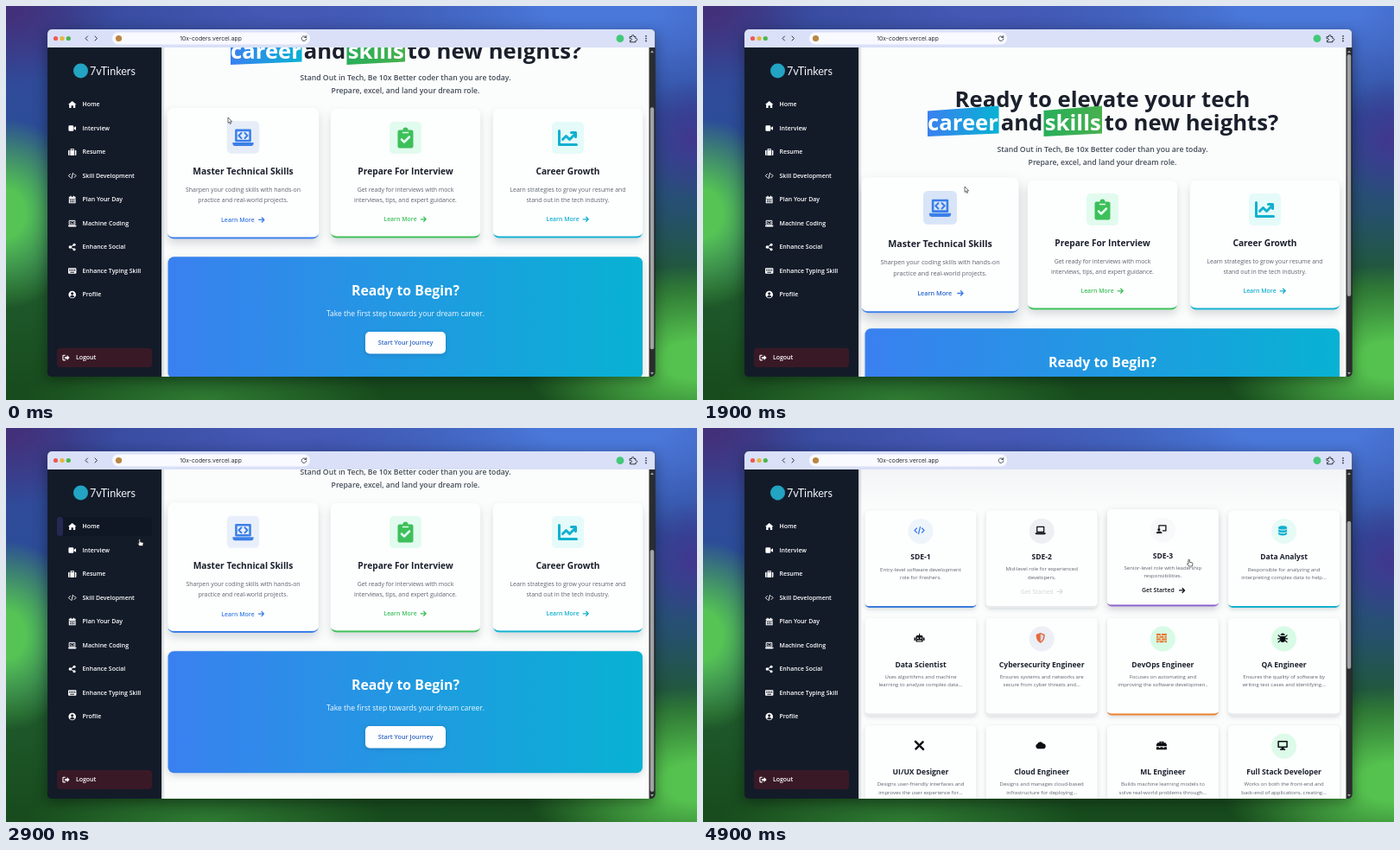
These frames come from a looping animation (800 px wide and 456 px high, 5000 ms). An HTML page:

```html
<!DOCTYPE html>
<html lang="en">
<head>
<meta charset="utf-8">
<title>Career site tour</title>
<style>
html, body { margin: 0; width: 100%; height: 100%; overflow: hidden; }
body {
  background:
    radial-gradient(ellipse 90px 110px at 0 240px, #55c455 25%, transparent),
    radial-gradient(ellipse 200px 110px at 800px 410px, #55c24f 20%, transparent),
    radial-gradient(ellipse 210px 60px at 230px 456px, #2f7a33, transparent),
    radial-gradient(ellipse 70px 70px at 795px 155px, #40378f, transparent),
    radial-gradient(ellipse 330px 130px at 690px 0, #4a78da 20%, transparent),
    radial-gradient(ellipse 260px 90px at 330px 0, #4458b4 15%, transparent),
    radial-gradient(ellipse 130px 90px at 0 0, #43307a 15%, transparent),
    linear-gradient(#35489a, #2c4c98 30%, #26506e 52%, #1f5a2c 72%, #174a1c);
}
svg { display: block; }
text { font-family: "Open Sans", "Noto Sans", sans-serif; }
</style>
</head>
<body>
<svg id="stage" width="800" height="456" viewBox="0 0 800 456"></svg>
<script>
const LOOP = 5000, STEP = 100;
const BLUE = '#3b7fe8', GREEN = '#3dc05a', CYAN = '#12b0d0', INK = '#1a202c', GRAY = '#5c636e';

// Markup helpers
const text = (x, y, size, str, fill = INK, weight = 400, anchor = 'middle', more = '') =>
  `<text x="${x}" y="${y + size * 0.357}" font-size="${size}" fill="${fill}" font-weight="${weight}" text-anchor="${anchor}" ${more}>${str}</text>`;
const rect = (x, y, w, h, r, fill, more = '') =>
  `<rect x="${x}" y="${y}" width="${w}" height="${h}" rx="${r}" fill="${fill}" ${more}/>`;
const line = (d, w = 2.5, color = 'currentColor') =>
  `<path d="${d}" fill="none" stroke="${color}" stroke-width="${w}" stroke-linecap="round" stroke-linejoin="round"/>`;
const fill = d => `<path d="${d}" fill="currentColor" fill-rule="evenodd"/>`;
const dot = (x, y, r, color = 'currentColor', more = '') => `<circle cx="${x}" cy="${y}" r="${r}" fill="${color}" ${more}/>`;
const grad = (id, a, b) =>
  `<linearGradient id="${id}"><stop stop-color="${a}"/><stop offset="1" stop-color="${b}"/></linearGradient>`;

// Icons on a 24 by 24 grid
const laptop = line('M4 4h16v12H4z') + fill('M0 18h24v1a3 3 0 0 1-3 3H3a3 3 0 0 1-3-3z');
const ICONS = {
  home: fill('M12 2 0 12h3v10h6v-7h6v7h6V12h3z'),
  video: fill('M4 4h9a3 3 0 0 1 3 3v10a3 3 0 0 1-3 3H4a3 3 0 0 1-3-3V7a3 3 0 0 1 3-3zM17 10l6-4v12l-6-4z'),
  bag: fill('M7 6V2h10v4h1v16H6V6zM9 6h6V4H9zM4 6v16H3a3 3 0 0 1-3-3V9a3 3 0 0 1 3-3zM20 6h1a3 3 0 0 1 3 3v10a3 3 0 0 1-3 3h-1z'),
  code: line('M6 7 1 12l5 5M18 7l5 5-5 5M14 4l-4 16'),
  date: fill('M6 1h3v3h6V1h3v3h4v5H2V4h4zM2 10h20v13H2zM5 12v3h4v-3zM10.500 12v3h4v-3zM16 12v3h3v-3zM5 17v3h4v-3zM10.500 17v3h4v-3zM16 17v3h3v-3z'),
  laptop,
  laptopCode: laptop + line('M10 7l-3 3 3 3M14 7l3 3-3 3', 2),
  share: line('M18 5 6 12l12 7') + dot(18, 5, 4) + dot(6, 12, 4.5) + dot(18, 19, 4),
  keys: fill('M2 4h20a2 2 0 0 1 2 2v12a2 2 0 0 1-2 2H2a2 2 0 0 1-2-2V6a2 2 0 0 1 2-2zM3 7v3h3V7zM8 7v3h3V7zM13 7v3h3V7zM18 7v3h3V7zM3 11.500v2h3v-2zM8 11.500v2h3v-2zM13 11.500v2h3v-2zM18 11.500v2h3v-2zM6 15.500v2h12v-2z'),
  user: fill('M12 1a11 11 0 1 0 0 22 11 11 0 0 0 0-22zM12 5a4 4 0 1 1 0 8 4 4 0 0 1 0-8zM5 18q3-4 7-4t7 4q-3 3-7 3t-7-3z'),
  exit: fill('M10 3v3H4v12h6v3H4a3 3 0 0 1-3-3V6a3 3 0 0 1 3-3zM15 4l8 8-8 8v-5H8V9h7z'),
  clip: fill('M5 3h4a3 3 0 0 1 6 0h4a2 2 0 0 1 2 2v17a2 2 0 0 1-2 2H5a2 2 0 0 1-2-2V5a2 2 0 0 1 2-2z') +
    line('M7.500 14l3 3 6-6', 2.5, '#e2fbef') + line('M9 6h6', 1.5, '#e2fbef'),
  chart: line('M2 4v16h20', 3) + line('M6 14l4-4 4 4 7-7M16 6h5v5', 3),
  teach: line('M6 9V4h16v12h-7') + dot(6, 13, 3) + fill('M0 22q0-5 5-5h3q5 0 5 5z'),
  data: fill('M2 5c0-5 20-5 20 0v2c0 4-20 4-20 0zM2 9c3 4 17 4 20 0v5c0 4-20 4-20 0zM2 16c3 4 17 4 20 0v4c0 5-20 5-20 0z'),
  robot: fill('M11 2h2v4h4a3 3 0 0 1 3 3v12H4V9a3 3 0 0 1 3-3h4zM7 11v3h3v-3zM14 11v3h3v-3zM7 17v2h10v-2zM0 11h3v7H0zM21 11h3v7h-3z'),
  shield: fill('M12 0 22 4q1 14-10 20Q1 18 2 4z') + '<path d="M12 3v17.500Q19.500 16 19 6z" fill="#d5dbe6"/>',
  brick: fill('M0 2h10v4H0zM12 2h12v4H12zM0 7.500h5v4H0zM7 7.500h10v4H7zM19 7.500h5v4h-5zM0 13h10v4H0zM12 13h12v4H12zM0 18.500h5v4H0zM7 18.500h10v4H7zM19 18.500h5v4h-5z'),
  bug: fill('M7 6a5 5 0 0 1 10 0zM6 8h12v8a6 6 0 0 1-12 0z') + line('M6 10 2 6M18 10l4-4M6 14H1M18 14h5M6 18l-4 4M18 18l4 4'),
  tools: line('M4 20 20 4', 5) + line('M3 3l6 6M15 15l6 6', 5),
  cloud: fill('M6 20a6 6 0 0 1-1-11.500A7 7 0 0 1 18 8a6 6 0 0 1 0 12z'),
  box: fill('M7 6V3h10v3h4l3 4v4H0v-4l3-4zM9.500 6h5V5h-5zM0 16h6v2h3v-2h6v2h3v-2h6v6H0z'),
  screen: line('M2 3h20v13H2z', 3) + fill('M9 17h6v3h3v3H6v-3h3z')
};
const icon = (name, x, y, size, color) =>
  `<g color="${color}" transform="translate(${x - size / 2} ${y - size / 2}) scale(${size / 24})">${ICONS[name]}</g>`;
const arrow = (id, x, y, color) =>
  `<g id="${id}" transform="translate(${x} ${y})">${line('M-3 0H3M.5-2.500 3 0 .5 2.500', 1.3, color)}</g>`;
// White card with a coloured bottom border that tapers into the corners
const panel = (id, x, y, w, h, r, edge) => {
  const q = r - 1.9, flat = w - 2 * r;
  return rect(x, y, w, h, r, '#fdfefe', `id="${id}"`) +
    `<path fill="${edge}" d="M${x} ${y + h - r}a${r} ${r} 0 0 0 ${r} ${r}h${flat}a${r} ${r} 0 0 0 ${r} ${-r}a${r} ${q} 0 0 1 ${-r} ${q}h${-flat}a${r} ${q} 0 0 1 ${-r} ${-q}z"/>`;
};

const FEATURES = [
  [274.5, 'Master Technical Skills', 'Sharpen your coding skills with hands-on', 'practice and real-world projects.', 'laptopCode', BLUE, '#eaf0fa'],
  [462.5, 'Prepare For Interview', 'Get ready for interviews with mock', 'interviews, tips, and expert guidance.', 'clip', GREEN, '#e2fbef'],
  [650.5, 'Career Growth', 'Learn strategies to grow your resume and', 'stand out in the tech industry.', 'chart', CYAN, '#e4fbf9']
];
const feature = ([x, title, a, b, name, color, tint], i) => `<g id="feat${i}">
  ${panel('fbase' + i, x - 86.7, 202, 173.4, 149.5, 7, color)}
  ${rect(x - 18.5, 217, 37, 37, 5, tint, `id="ftint${i}"`)}${icon(name, x, 235.5, 24, color)}
  ${text(x, 274.8, 10.2, title, INK, 700)}
  ${text(x, 295.5, 6.9, a, GRAY)}${text(x, 307.5, 6.9, b, GRAY)}
  ${text(x - 6, 329.8, 6.9, 'Learn More', color, 600, 'middle', `id="flink${i}"`)}${arrow('farrow' + i, x + 20.7, 329.8, color)}</g>`;

const ROLES = [
  ['SDE-1', 'Entry-level software development', 'role for Freshers.', 'code', BLUE, '#edf4fa', '#3b7bdc'],
  ['SDE-2', 'Mid-level role for experienced', 'developers.', 'laptop', '#0b0d12', '#edeff3', '#e6e8ea'],
  ['SDE-3', 'Senior-level role with leadership', 'responsibilities.', 'teach', '#0b0d12', '#f8f9fa', '#8a5fcb'],
  ['Data Analyst', 'Responsible for analyzing and', 'interpreting complex data to help...', 'data', CYAN, '#e6faf6', '#14b0cb'],
  ['Data Scientist', 'Uses algorithms and machine', 'learning to analyze complex data...', 'robot'],
  ['Cybersecurity Engineer', 'Ensures systems and networks are', 'secure from cyber threats and...', 'shield', '#e8683a', '#eceff5'],
  ['DevOps Engineer', 'Focuses on automating and', 'improving the software developmen..', 'brick', '#e8782e', '#d8fbe6', '#e8802e'],
  ['QA Engineer', 'Ensures the quality of software by', 'writing test cases and identifying...', 'bug', '#0b0d12', '#d8fbe6'],
  ['UI/UX Designer', 'Designs user-friendly interfaces and', 'improves the user experience for...', 'tools'],
  ['Cloud Engineer', 'Designs and manages cloud-based', 'infrastructure for deploying...', 'cloud'],
  ['ML Engineer', 'Builds machine learning models to', 'solve real-world problems through...', 'box'],
  ['Full Stack Developer', 'Works on both the front-end and', 'back-end of applications, creating...', 'screen', '#0b0d12', '#dcfbe8']
];
const role = ([title, a, b, name, color = '#0b0d12', tint = '#fdfefe', edge = '#e6e8ea'], i) => {
  const x = 252 + i % 4 * 140.2, y = 95.5 + Math.floor(i / 4) * 124.4;
  const link = i < 3 ? `<g id="rlink${i}">${text(x - 5.5, y + 94, 6.9, 'Get Started', color, 600)}${arrow('rarrow' + i, x + 20.7, y + 94, color)}</g>` : '';
  return `<g id="role${i}">${panel('rbase' + i, x - 64.5, y, 129, 112.5, 5, edge)}
    ${dot(x, y + 24, 14.5, tint, `id="rtint${i}"`)}${icon(name, x - 1.5, y + 23, 12, color)}
    ${text(x, y + 53.7, 8.55, title, INK, 700)}
    ${text(x, y + 68, 6.03, a, GRAY)}${text(x, y + 77.2, 6.03, b, GRAY)}${link}</g>`;
};

const MENU = [['Home', 'home'], ['Interview', 'video'], ['Resume', 'bag'], ['Skill Development', 'code'],
  ['Plan Your Day', 'date'], ['Machine Coding', 'laptopCode'], ['Enhance Social', 'share'],
  ['Enhance Typing Skill', 'keys'], ['Profile', 'user']];
const menuRow = ([label, name], i) => {
  const y = 114 + i * 27.5;
  return `<g id="row${i}" opacity="0">${rect(59, y - 11, 110, 22, 4, '#0e1624')}${rect(59, y - 11, 7, 22, 3, '#2c2d5e')}</g>` +
    icon(name, 76.7, y, 9.4, '#fff') + text(88.5, y, 6.95, label, '#fff', 600, 'start');
};

const homePage = `<g id="home"><g id="scroller">
  ${text(462.5, 107.4, 25.7, 'Ready to elevate your tech', INK, 700)}
  <path d="M260 121.500 342.500 115.500v32L260 151z" fill="url(#gBlue)"/>
  <path d="M394.500 121 462 115.500v32L394.500 151z" fill="url(#gGreen)"/>
  ${text(301, 135, 25.7, 'career', '#fff', 700)}${text(369, 135, 25.7, 'and', INK, 700)}
  ${text(428.3, 135, 25.7, 'skills', '#fff', 700)}${text(565.5, 135, 25.7, 'to new heights?', INK, 700)}
  ${text(462.5, 165.7, 8.7, 'Stand Out in Tech, Be 10x Better coder than you are today.', '#454d5a', 600)}
  ${text(462.5, 180.7, 8.7, 'Prepare, excel, and land your dream role.', '#454d5a', 600)}
  ${FEATURES.map(feature).join('')}
  ${rect(187.5, 373.3, 549.5, 141, 7, 'url(#gBlue)', 'style="filter:drop-shadow(0 3px 4px rgba(30,40,60,.18))"')}
  ${text(462.5, 412.7, 15.85, 'Ready to Begin?', '#fff', 700)}
  ${text(462.5, 439, 8.55, 'Take the first step towards your dream career.', '#f3f9ff')}
  ${rect(416, 460, 93, 25.5, 5, '#fdfeff', 'style="filter:drop-shadow(0 1px 2px rgba(20,40,80,.25))"')}
  ${text(462.5, 472.8, 7.25, 'Start Your Journey', '#2f66c6', 600)}
</g></g>`;

const rolesPage = `<g id="roles">${rect(180, 48, 564, 47, 0, 'url(#gTop)')}${ROLES.map(role).join('')}</g>`;

const sidebar = rect(180, 48, 4, 381, 0, 'url(#gSide)') + rect(48, 48, 132, 381, 0, '#131b29') +
  dot(86.5, 75, 8.5, '#22a4c2') +
  text(97, 75.5, 12.6, '7vTinkers', '#f4f7fa', 400, 'start', 'style="font-family:Lato,sans-serif"') +
  MENU.map(menuRow).join('') + rect(59, 396, 110, 22, 4, '#3a1926') +
  icon('exit', 69.5, 407, 9, '#fff') + text(81, 407, 6.95, 'Logout', '#fff', 600, 'start');

const status = `<g id="status">${rect(48, 419, 115, 10, 2, '#26292f')}
  ${text(50.5, 423.8, 5.2, 'https://10x-coders.vercel.app/interview/SDE-1', '#e2e5ea', 400, 'start')}</g>`;

const toolbar = rect(48, 27, 703.5, 21, 0, '#d9e0f7') +
  dot(57.5, 37.5, 2.6, '#ee5a50') + dot(65, 37.5, 2.6, '#e6b53c') + dot(72.3, 37.5, 2.6, '#4db64c') +
  line('M94.500 35 92 37.500l2.500 2.500M103 35l2.500 2.500-2.500 2.500', 1, '#30343c') +
  rect(123, 30.5, 229, 14, 7, '#f9faff') + dot(130.5, 37.5, 3.6, '#b98642') +
  text(237, 37.7, 6.8, '10x-coders.vercel.app', '#2a2d34', 400, 'middle', 'style="font-family:Inter,sans-serif"') +
  line('M347 35.700A2.800 2.800 0 1 0 347.800 38M347.800 34.500v2h-2', 0.9, '#3c4048') +
  dot(711, 37.7, 4.4, '#43c878') +
  line('M722.500 35.500h2a1.300 1.300 0 1 1 2.400 0h2v2.200a1.300 1.300 0 1 1 0 2.300v1.800h-6.400v-2a1.300 1.300 0 1 0 0-2.200z', 1, '#30343c') +
  [34.8, 37.6, 40.4].map(y => dot(741, y, 0.9, '#30343c')).join('');

const scrollbar = rect(744.5, 48, 7, 381, 0, '#2b2c2e') +
  '<path d="M746 54h4l-2-2.600zM746 424h4l-2 2.600z" fill="#a4a6a8"/>' + rect(745.8, 56, 4.4, 280, 2.2, '#a0a2a4', 'id="thumb"');

const cursors = `<g id="cursor">
  <path id="arrow" d="M0 0v6.500l1.500-1.300 1 2.300 1.100-.5-1-2.200h2z" fill="#fff" stroke="#333" stroke-width=".7"/>
  <path id="beam" d="M-1.500-3h1Q0-3 0-2.500 0-3 .5-3h1M0-2.500v5M-1.500 3h1Q0 3 0 2.500 0 3 .5 3h1" fill="none" stroke="#222" stroke-width=".8"/>
  <path id="hand" d="M-1.600-4q.8-.8 1.400 0v2.800l2.900.6q.9.300.8 1.200l-.6 2.900H-1L-3 .8q.3-1 1.400 0z" fill="#fff" stroke="#222" stroke-width=".7"/></g>`;

const stage = document.getElementById('stage');
stage.innerHTML = `<defs>${grad('gBlue', '#3a80f0', '#08b2d3')}${grad('gGreen', '#27ae5a', '#48b04e')}${grad('gSide', 'rgba(20,30,45,.22)', 'rgba(20,30,45,0)')}
  <linearGradient id="gTop" x2="0" y2="1"><stop stop-color="#f3f4f6"/><stop offset="1" stop-color="#fbfdfc"/></linearGradient>
  <clipPath id="win">${rect(48, 27, 703.5, 402, 5, '#000')}</clipPath>
  <clipPath id="view">${rect(180, 48, 565, 381, 0, '#000')}</clipPath></defs>
  ${rect(48, 27, 703.5, 402, 5, '#101820', 'style="filter:drop-shadow(0 4px 8px rgba(0,0,0,.4))"')}
  <g clip-path="url(#win)">${rect(180, 48, 565, 381, 0, '#fbfdfc')}
  <g clip-path="url(#view)">${homePage}${rolesPage}</g>
  ${sidebar}${status}${toolbar}${scrollbar}</g>${cursors}`;

const $ = id => document.getElementById(id);
const show = (id, on) => $(id).setAttribute('display', on ? 'inline' : 'none');
const move = (id, x, y) => $(id).setAttribute('transform', `translate(${x} ${y})`);

// Value rows: time, then numbers
const SCROLL = [[0, 83], [700, 83], [1100, 4.5], [1200, 0], [2000, 0], [2300, 33.5], [2700, 115], [LOOP, 115]];
const POINTER = [[0, 257, 129], [500, 303.5, 209], [1400, 303.5, 209], [1600, 303, 209], [2400, 303, 209],
  [2700, 186, 160], [2900, 155.5, 133], [3000, 150, 140], [3200, 148, 142], [3700, 284.5, 168.5], [4200, 284.5, 168.5], [4900, 563.5, 156.5], [LOOP, 563.5, 156.5]];
const SHAPES = [[0, 'arrow'], [500, 'beam'], [1300, 'arrow'], [2800, 'hand'], [3300, 'arrow'], [3500, 'hand']];
const HOVERS = { feat0: [-40, 2700], row0: [2750, 3000], row1: [3000, 3300], role0: [3500, 4290], role1: [4310, 4710], role2: [4660, 6000] };
const NAV = 3200;

const at = (rows, t) => {
  const i = Math.max(1, rows.findIndex(r => r[0] > t)), a = rows[i - 1], b = rows[i];
  const p = (t - a[0]) / (b[0] - a[0]);
  return a.slice(1).map((v, k) => v + (b[k + 1] - v) * p);
};
const ease = p => 1 - (1 - Math.min(1, Math.max(0, p))) ** 2;
const hover = (id, t) => ease((t - HOVERS[id][0]) / 300) - ease((t - HOVERS[id][1]) / 300);
const mix = (a, b, p) => `rgb(${a.map((v, i) => Math.round(v + (b[i] - v) * p))})`;
const shadow = (id, h, y, blur, alpha) =>
  $(id).style.filter = `drop-shadow(0 ${y + 2 * h}px ${blur + 2 * h}px rgba(30,40,60,${alpha + 0.06 * h}))`;
const featShadow = (i, h) => shadow('fbase' + i, h, 5, 5, 0.17);
const roleShadow = (i, h) => shadow('rbase' + i, h, 2, 2.5, 0.17);

FEATURES.forEach((_, i) => featShadow(i, 0));
ROLES.forEach((_, i) => roleShadow(i, 0));

function draw(t) {
  const home = t < NAV, [scroll] = at(SCROLL, t), [x, y] = at(POINTER, t);
  show('home', home);
  show('roles', !home);
  move('scroller', 0, -scroll);
  $('thumb').setAttribute('y', 56 + scroll * (home ? 0.739 : 0.45));
  $('thumb').setAttribute('height', home ? 280 : 171);

  const h = hover('feat0', t), size = 1 + 0.05 * h;
  $('feat0').setAttribute('transform', `translate(274.5 276.7) scale(${size}) translate(-274.5 -276.7)`);
  featShadow(0, h);
  $('ftint0').setAttribute('fill', mix([234, 240, 250], [216, 228, 247], h));
  $('flink0').setAttribute('fill', mix([59, 127, 232], [37, 99, 205], h));
  move('farrow0', 295.2 + 1.6 * h, 329.8);

  for (let i = 0; i < 2; i++) $('row' + i).setAttribute('opacity', hover('row' + i, t));
  for (let i = 0; i < 3; i++) {
    const r = hover('role' + i, t);
    move('role' + i, 0, -1.6 * r);
    roleShadow(i, r);
    $('rlink' + i).setAttribute('opacity', r);
    move('rarrow' + i, 272.7 + 140.2 * i + 1.5 * r, 189.5);
  }
  $('rtint0').setAttribute('fill', mix([237, 244, 250], [217, 231, 248], hover('role0', t)));
  show('status', t >= 3600 && t < 4400);

  const shape = SHAPES.filter(s => s[0] <= t).pop()[1];
  for (const id of ['arrow', 'beam', 'hand']) show(id, id === shape);
  move('cursor', x, y);
}

const start = performance.now();
function tick() {
  const t = (performance.now() - start) % LOOP;
  draw(Math.floor(t / STEP) * STEP);
  requestAnimationFrame(tick);
}
draw(0);
requestAnimationFrame(tick);
</script>
</body>
</html>
```
